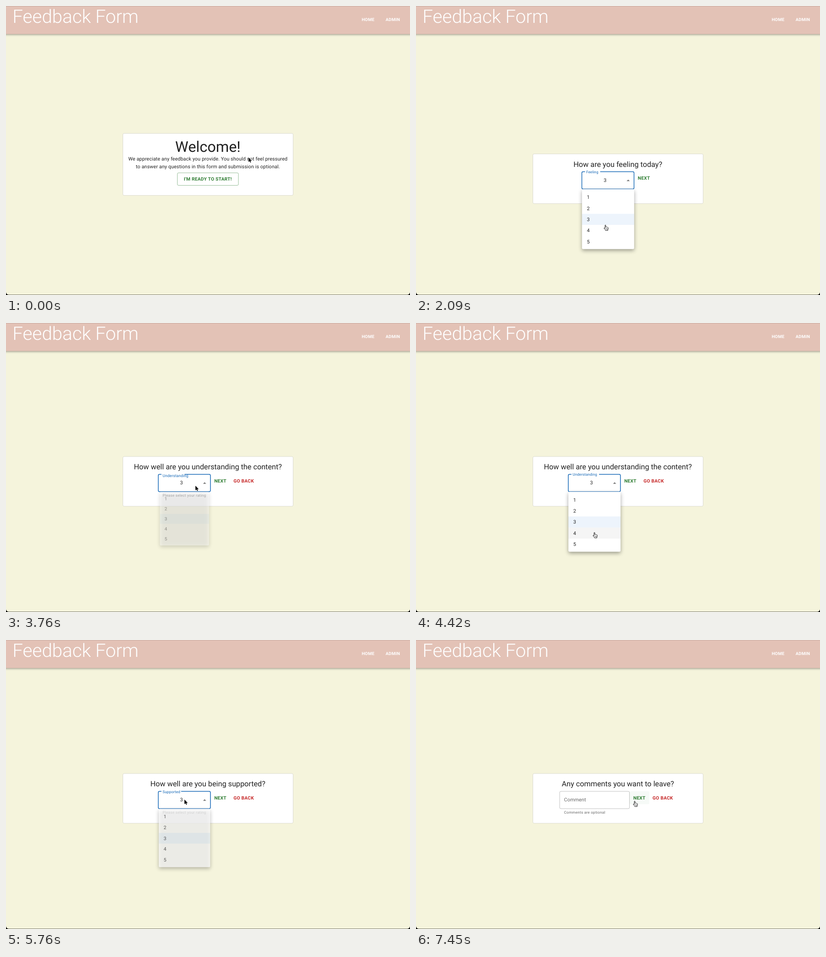
Write an HTML page with a canvas that moves like this. It is 883 px wide and 634 px high and loops after 8000 ms.

```html
<!DOCTYPE html>
<html lang="en">
<head>
<meta charset="utf-8">
<title>Feedback Form</title>
<style>
html, body { margin: 0; width: 100%; height: 100%; overflow: hidden; background: #000; }
canvas { display: block; width: 883px; height: 634px; }
</style>
</head>
<body>
<canvas id="stage"></canvas>
<script>
const W = 883, H = 634, LOOP = 8000;
const REM = 0.676; // page zoom
const INK = 'rgba(0,0,0,.87)', SOFT = 'rgba(0,0,0,.6)';
const GREEN = '#2e7d32', RED = '#c62828', BLUE = '#1a6bb8';
const FIELD_W = 114, FIELD_H = 38, ROW = 36 * REM, MENU_PAD = 8 * REM, GROW = 279;

const canvas = document.getElementById('stage');
const dpr = window.devicePixelRatio || 1;
canvas.width = W * dpr;
canvas.height = H * dpr;
const ctx = canvas.getContext('2d');

const pages = [
  { start: 640, end: 3080, x: 362.5, y: 363.5, title: 'How are you feeling today?', label: 'Feeling', open: 1420, close: 2440, pick: 4 },
  { start: 3080, end: 5080, x: 332.8, y: 332, title: 'How well are you understanding the content?', label: 'Understanding', open: 3670, close: 4440, pick: 4, back: true },
  { start: 5080, end: 7330, x: 332.8, y: 332, title: 'How well are you being supported?', label: 'Supported', open: 5630, close: 6720, pick: 5, back: true },
  { start: 7330, end: LOOP, x: 314, y: 332, w: 152.6, title: 'Any comments you want to leave?', label: 'Comment', open: Infinity, close: Infinity, back: true }
];

// Pointer stops: time, x, y
const stops = [
  [0, 530, 332], [210, 485, 362], [350, 485, 362], [520, 482.5, 374], [960, 482.5, 374],
  [1300, 414, 381], [1640, 414, 381], [1970, 414, 478], [2090, 414, 480], [2240, 414, 481],
  [2480, 414, 481], [2860, 481, 373], [3200, 481, 373], [3580, 414, 357], [3800, 414, 357],
  [4000, 390, 458], [4180, 390, 459], [4480, 390, 459], [4900, 457, 352], [5200, 457, 352],
  [5540, 390, 350], [5790, 390, 350], [6000, 388, 441], [6480, 388, 484], [6750, 388, 484],
  [7200, 478, 353], [LOOP, 478, 353]
];

const ARROW = new Path2D('M0 0V10.2L2.3 8.1 3.9 11.6 5.5 10.9 4 7.5H7.2Z');
const HAND = new Path2D('M3 8V1.4a.9.9 0 0 1 1.8 0V5l.9-.3.9.4.9-.1.9.5 1 .2.6.8V9l-.8 1.8v1.6H4.2L3.3 10.6 1.2 8.4C.4 7.5.8 6.6 1.7 6.9L3 8Z');

const clamp = v => Math.max(0, Math.min(1, v));
const mix = (a, b, p) => a + (b - a) * p;
const easeOut = p => 1 - (1 - clamp(p)) ** 3;

// cubic-bezier(.4, 0, .2, 1)
function ease(p) {
  p = clamp(p);
  let lo = 0, hi = 1;
  for (let i = 0; i < 20; i++) {
    const s = (lo + hi) / 2;
    const x = 1.2 * s * (1 - s) ** 2 + 0.6 * s * s * (1 - s) + s ** 3;
    if (x < p) lo = s; else hi = s;
  }
  return lo * lo * (3 - 2 * lo);
}

function pointerAt(t) {
  const i = Math.max(1, stops.findIndex(s => s[0] >= t));
  const [t0, x0, y0] = stops[i - 1], [t1, x1, y1] = stops[i];
  const p = (t - t0) / (t1 - t0), e = p * p * (3 - 2 * p);
  return { x: mix(x0, x1, e), y: mix(y0, y1, e) };
}

const inside = (c, x, y, w, h) => c.x >= x && c.x < x + w && c.y >= y && c.y < y + h;

function text(str, x, y, size, color, { weight = 400, align = 'left', gap = 0 } = {}) {
  ctx.font = `${weight} ${size}px Roboto, sans-serif`;
  ctx.letterSpacing = gap * size + 'px';
  ctx.textAlign = align;
  ctx.fillStyle = color;
  ctx.fillText(str, x, y);
  return ctx.measureText(str).width;
}

function box(x, y, w, h, r, fill, stroke, line = 1) {
  ctx.beginPath();
  ctx.roundRect(x, y, w, h, r);
  if (fill) { ctx.fillStyle = fill; ctx.fill(); }
  if (stroke) { ctx.strokeStyle = stroke; ctx.lineWidth = line; ctx.stroke(); }
}

function shadow(alpha, blur, dy) {
  ctx.shadowColor = `rgba(0,0,0,${alpha})`;
  ctx.shadowBlur = blur * dpr;
  ctx.shadowOffsetY = dy * dpr;
}

const bold = (str, x, y, size, color, align) => text(str, x, y, size, color, { weight: 600, gap: 0.02857, align });
const card = (y, h) => box(255.5, y, 372, h, 2.7, '#fff', 'rgba(0,0,0,.12)');

function drawShell() {
  ctx.fillStyle = '#000';
  ctx.fillRect(0, 0, W, H);
  box(0, 0, W, H - 0.5, [0, 0, 6, 6], '#f5f4dc');
  ctx.save();
  shadow(0.45, 5, 1.5);
  ctx.fillStyle = '#e3c2b6';
  ctx.fillRect(-10, -10, W + 20, 71.6);
  ctx.restore();
  ctx.fillStyle = 'rgba(0,0,0,.12)';
  ctx.fillRect(0, 0, W, 1);
  text('Feedback Form', 14.3, 37.3, 60 * REM, '#fff', { weight: 300, gap: -0.002 });
  bold('HOME', 777.4, 33.1, 14 * REM, '#fff');
  bold('ADMIN', 829.7, 33.1, 14 * REM, '#fff');
}

function drawWelcome(c) {
  const hover = inside(c, 374, 366, 134, 28);
  const body = { align: 'center', gap: 0.00938 };
  card(279.5, 136);
  text('Welcome!', 441.3, 320, 48 * REM, INK, { align: 'center' });
  text('We appreciate any feedback you provide. You should not feel pressured', 441.2, 339.4, 16 * REM, INK, body);
  text('to answer any questions in this form and submission is optional.', 441.2, 355.7, 16 * REM, INK, body);
  box(374.5, 366, 133.5, 27.5, 2.7, hover && 'rgba(46,125,50,.04)', hover ? GREEN : 'rgba(46,125,50,.5)');
  bold("I'M READY TO START!", 441.2, 383.2, 15 * REM, GREEN, 'center');
  return hover;
}

function drawField(p, t, c, hover) {
  const { x, y, w = FIELD_W } = p;
  const focused = t >= p.open && t < p.end - 100;
  const color = t >= p.open ? BLUE : SOFT;
  const shrink = easeOut((t - p.open) / 200);
  const size = mix(16, 12, shrink) * REM;
  const border = focused ? BLUE : hover ? INK : 'rgba(0,0,0,.25)';
  box(x, y, w, FIELD_H, 2.7, null, border, focused ? 1.5 : 1);

  if (p.pick) {
    text(t >= p.close ? p.pick : 3, x + 50.8, y + 22.4, 16 * REM, INK, { align: 'center' });
    const up = t >= p.open && t < p.close ? -1 : 1;
    const ax = x + 101.3, ay = y + 19;
    ctx.fillStyle = 'rgba(0,0,0,.54)';
    ctx.beginPath();
    ctx.moveTo(ax - 3.4, ay - 1.7 * up);
    ctx.lineTo(ax + 3.4, ay - 1.7 * up);
    ctx.lineTo(ax, ay + 1.7 * up);
    ctx.fill();
  }
  if (shrink > 0) {
    ctx.font = `400 ${12 * REM}px Roboto, sans-serif`;
    ctx.letterSpacing = '0.08px';
    ctx.fillStyle = '#fff';
    ctx.fillRect(x + 7, y - 1.5, (ctx.measureText(p.label).width + 6.5) * shrink, 3);
  }
  text(p.label, x + 9.5, mix(y + 22.4, y + 3, shrink), size, color, { gap: 0.00938 });
  text(p.pick ? 'Please select your rating' : 'Comments are optional', x + 9.5, y + 49.4, 12 * REM, SOFT, { gap: 0.03333 });
}

function drawMenu(p, t, c) {
  const closing = t >= p.close;
  const age = (t - (closing ? p.close : p.open)) / GROW;
  const alpha = closing ? 1 - ease(age) : ease(age);
  const grown = closing ? 1 - ease((age - 0.333) * 1.5) : ease(age * 1.5);
  const h = 5 * ROW + 2 * MENU_PAD - 1;
  const top = p.y + FIELD_H + 0.3;
  let hover = false;

  ctx.save();
  ctx.globalAlpha = alpha;
  ctx.translate(p.x + FIELD_W / 2, top);
  ctx.scale(mix(0.75, 1, grown), mix(0.5625, 1, grown));
  ctx.translate(-FIELD_W / 2, 0);
  ctx.save();
  shadow(0.36, 8, 3.5);
  box(0.3, 0, FIELD_W, h, 2.7, '#fff');
  ctx.restore();
  for (let i = 0; i < 5; i++) {
    const y = MENU_PAD + i * ROW;
    const over = !closing && inside(c, p.x, top + y, FIELD_W, ROW);
    const selected = i + 1 === (closing ? p.pick : 3);
    if (selected || over) {
      ctx.fillStyle = selected ? 'rgba(25,118,210,.08)' : 'rgba(0,0,0,.04)';
      ctx.fillRect(0.3, y, FIELD_W, ROW);
    }
    text(i + 1, 11, y + 16, 16 * REM, INK, { gap: 0.00938 });
    hover ||= over;
  }
  ctx.restore();
  return hover;
}

function drawPage(p, t, c) {
  const { x, y, w = FIELD_W } = p;
  const modal = t >= p.open && t < p.close + GROW;
  const overField = !modal && inside(c, x, y, w, FIELD_H);
  const overNext = !modal && inside(c, x + w, y - 0.3, 43.3, 28.6);
  card(y - 39, 109);
  text(p.title, 441.2, y - 10.6, 24 * REM, INK, { align: 'center' });
  drawField(p, t, c, overField);
  if (overNext) box(x + w, y - 0.3, 43.3, 28.6, 2.7, 'rgba(46,125,50,.04)');
  bold('NEXT', x + w + 21.7, y + 17.6, 15 * REM, GREEN, 'center');
  if (p.back) bold('GO BACK', x + w + 50.5, y + 17.6, 15 * REM, RED);
  const overItem = modal && drawMenu(p, t, c);
  return overField || overNext || overItem;
}

function drawScrollbar(t) {
  const [first] = pages;
  const alpha = t < first.start || t >= first.end ? 0
    : t < first.close ? 1 - clamp((t - first.open) / 200)
    : t >= first.close + GROW ? 1 : 0;
  if (alpha) box(877.6, -5, 5, 578, 2.5, `rgba(0,0,0,${0.5 * alpha})`);
}

function drawPointer(c, hand) {
  ctx.save();
  ctx.translate(c.x - (hand ? 3.9 : 0), c.y);
  ctx.lineJoin = 'round';
  ctx.lineWidth = hand ? 0.9 : 1.4;
  ctx.strokeStyle = hand ? '#000' : '#fff';
  ctx.fillStyle = hand ? '#fff' : '#000';
  const shape = hand ? HAND : ARROW;
  if (hand) { ctx.fill(shape); ctx.stroke(shape); }
  else { ctx.stroke(shape); ctx.fill(shape); }
  if (hand) {
    ctx.lineWidth = 0.6;
    for (const x of [5.2, 6.7, 8.2]) {
      ctx.beginPath();
      ctx.moveTo(x, 8);
      ctx.lineTo(x, 10.4);
      ctx.stroke();
    }
  }
  ctx.restore();
}

function draw(t) {
  const c = pointerAt(t);
  const page = pages.find(p => t >= p.start && t < p.end);
  ctx.setTransform(dpr, 0, 0, dpr, 0, 0);
  ctx.textRendering = 'geometricPrecision';
  drawShell();
  const hand = page ? drawPage(page, t, c) : drawWelcome(c);
  drawScrollbar(t);
  drawPointer(c, hand);
}

const begin = performance.now();
function tick() {
  draw((performance.now() - begin) % LOOP);
  requestAnimationFrame(tick);
}
tick();
</script>
</body>
</html>
```
